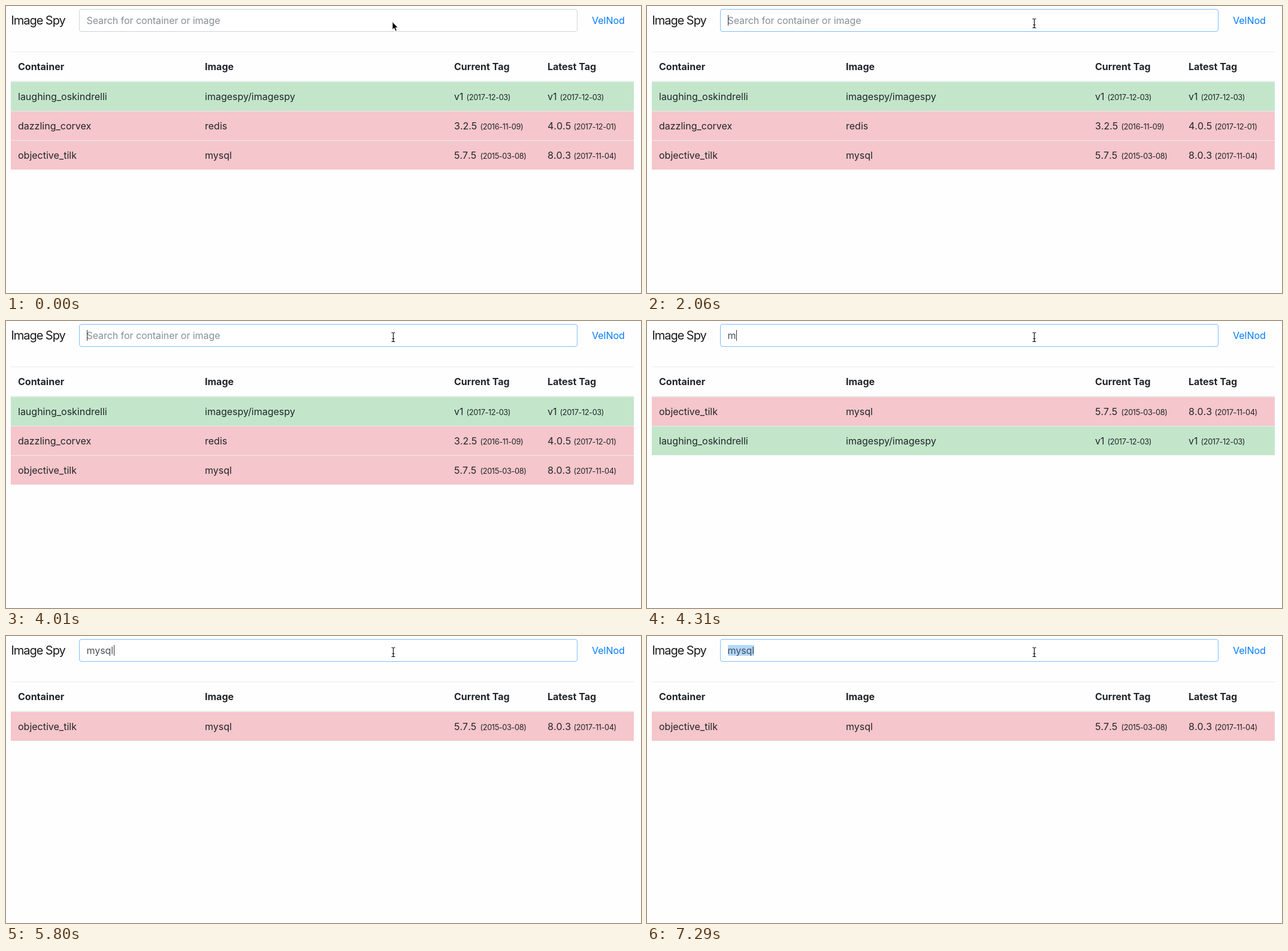
These frames come from a looping animation (1060x479 px, 8000 ms). An HTML page:

```html
<!DOCTYPE html>
<html lang="en">
<head>
<meta charset="utf-8">
<title>Image Spy</title>
<style>
  html, body { margin: 0; width: 100%; height: 100%; overflow: hidden; background: #fefefe; }
  svg { display: block; width: 1060px; height: 479px; }
  text { font: 400 16px Inter, "Liberation Sans", sans-serif; fill: #212529; white-space: pre; }
  .brand { font-size: 20px; letter-spacing: -1.05px; fill: #1a1a1a; }
  .link { fill: #007bff; }
  .head { font-weight: 700; }
  .field { letter-spacing: -.07px; }
  .tag, .date { font-kerning: none; font-feature-settings: "calt" 0; }
  .date { font-size: 12.8px; letter-spacing: -.4px; }
  .line { fill: #e9ecef; }
</style>
</head>
<body>
<svg id="stage" viewBox="0 0 1060 479"></svg>
<script>
const LOOP = 8000;
const COLS = [20, 332, 748, 904];
const CARET_X = [135, 149, 158, 166, 176, 180];
const QUERY = "mysql";
const GREEN = "#c3e6cb", PINK = "#f5c6cb";

const KEYS = [4310, 4610, 5060, 5200, 5800];
const BLINKS = [1020, 1470, 1910, 2510, 2960, 3410, 4010, 6250, 6700];
const FOCUS = 1020, SELECT = 7290;
// time, x, y of the text pointer
const BEAM = [[1760, 645.5, 23], [2060, 646, 21], [2210, 646, 20], [2810, 646, 19]];

const stage = document.getElementById("stage");

function add(parent, tag, attrs, content) {
  const el = document.createElementNS("http://www.w3.org/2000/svg", tag);
  for (const k in attrs) el.setAttribute(k, attrs[k]);
  if (content) el.textContent = content;
  parent.appendChild(el);
  return el;
}
const label = (parent, x, y, content, cls = "") => add(parent, "text", { x, y, class: cls }, content);
const box = (x, y, width, height, attrs) => add(stage, "rect", { x, y, width, height, ...attrs });
const show = (el, on) => el.setAttribute("visibility", on ? "visible" : "hidden");
const passed = (times, t) => times.filter(at => t >= at).length;

function makeRow(color, container, image, ...tags) {
  const g = add(stage, "g", {});
  add(g, "rect", { x: 8, y: 0, width: 1040, height: 49, fill: color });
  add(g, "rect", { x: 8, y: 0, width: 1040, height: 1, class: "line" });
  label(g, COLS[0], 31, container);
  label(g, COLS[1], 31, image);
  tags.forEach(([tag, date], i) => {
    const x = COLS[i + 2];
    label(g, x, 31, tag, "tag");
    label(g, x + (tag.length > 2 ? 43.5 : 20.5), 31, `(${date})`, "date");
  });
  return g;
}

label(stage, 8.5, 31, "Image Spy", "brand");
const field = box(122.5, 5.5, 831, 37, { rx: 3.5, fill: "#fff" });
const selection = box(135, 15, 44, 18, { fill: "#b3d7ff" });
const typed = label(stage, 134.5, 30, "", "field");
const caret = box(135, 15, 1, 18, { fill: "#30363b" });
label(stage, 978, 30, "VelNod", "link");

const rows = {
  spy: makeRow(GREEN, "laughing_oskindrelli", "imagespy/imagespy", ["v1", "2017-12-03"], ["v1", "2017-12-03"]),
  redis: makeRow(PINK, "dazzling_corvex", "redis", ["3.2.5", "2016-11-09"], ["4.0.5", "2017-12-01"]),
  mysql: makeRow(PINK, "objective_tilk", "mysql", ["5.7.5", "2015-03-08"], ["8.0.3", "2017-11-04"])
};
const RESULTS = [["spy", "redis", "mysql"], ["mysql", "spy"], ["mysql"]];

box(8, 76, 1040, 1, { class: "line" });
box(8, 125, 1040, 2, { class: "line" });
["Container", "Image", "Current Tag", "Latest Tag"].forEach((name, i) => label(stage, COLS[i], 107, name, "head"));

const arrow = add(stage, "path", {
  d: "M645 26.5v13l3-2.7 2 4.9 2.3-1-2-4.6h4z",
  fill: "#000", stroke: "#fff", "stroke-width": .8
});
const beam = add(stage, "path", {
  d: "M-3 .5h1.5Q0 .5 0 2V14Q0 15.5-1.5 15.5H-3M3 .5H1.5Q0 .5 0 2M0 14Q0 15.5 1.5 15.5H3M-2 10.5H2",
  fill: "none", stroke: "#111", "stroke-width": 1.2
});

function draw(t) {
  const count = passed(KEYS, t);
  const focused = t >= FOCUS, selected = t >= SELECT;

  field.setAttribute("stroke", focused ? "#80bdff" : "#ced4da");
  typed.textContent = count ? QUERY.slice(0, count) : "Search for container or image";
  typed.style.fill = count ? "#495057" : "#868e96";
  caret.setAttribute("x", CARET_X[count]);
  show(caret, !selected && passed(BLINKS, t) % 2);
  show(selection, selected);

  const list = RESULTS[Math.min(count, 2)];
  for (const name in rows) {
    const i = list.indexOf(name);
    show(rows[name], i >= 0);
    rows[name].setAttribute("transform", `translate(0 ${126 + 49 * Math.max(i, 0)})`);
  }

  const step = BEAM.filter(([at]) => t >= at).pop();
  show(arrow, !step);
  show(beam, step);
  if (step) beam.setAttribute("transform", `translate(${step[1] + .5} ${step[2]})`);
}

const start = performance.now();
function tick() {
  draw((performance.now() - start) % LOOP);
  requestAnimationFrame(tick);
}
draw(0);
requestAnimationFrame(tick);
</script>
</body>
</html>
```
